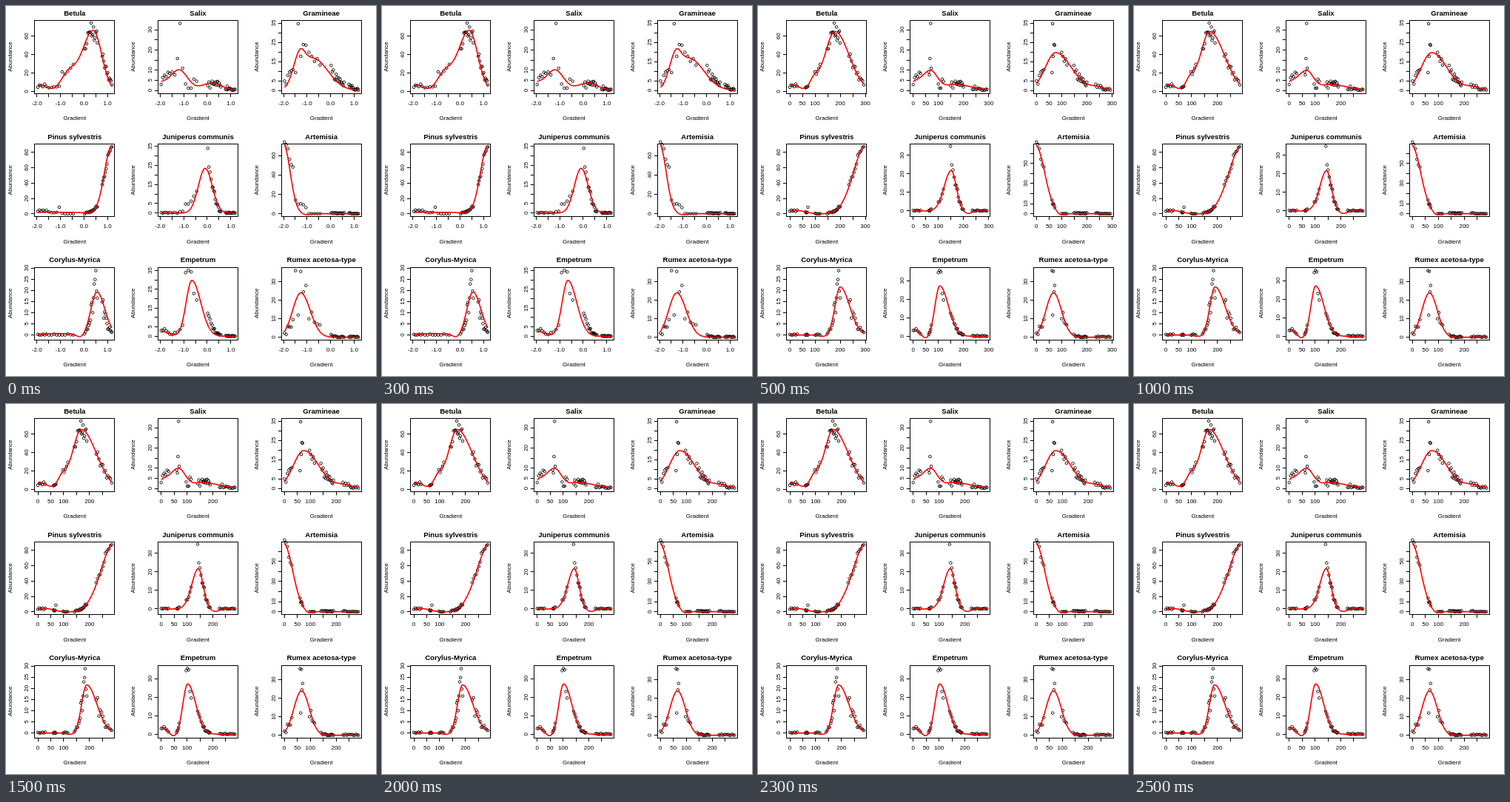
An HTML page with a canvas for the animation above (3000 ms loop, 500 px wide and 500 px high).

```html
<!DOCTYPE html>
<html>
<head>
<meta charset="utf-8">
<style>
html, body { margin: 0; width: 100%; height: 100%; overflow: hidden; background: #fff; }
canvas { display: block; }
</style>
</head>
<body>
<canvas id="stage" width="500" height="500"></canvas>
<script>
const ctx = document.getElementById('stage').getContext('2d');
const FONT = '"Liberation Sans", Arial, sans-serif';
const STEP = 500, PANEL = 500 / 3;
const BOX = { left: 38.97, top: 19.96, right: 146.7, bottom: 118.2 };
// How far the middle of the gradient has settled to the left in each step
const SHIFT = [0, 0, 1.5, 1.9, 2.05, 2.1];

let seed = 11;
const random = () => (seed = seed * 16807 % 2147483647) / 2147483647;

// Evenly spread samples: a group spans a range before and another after fitting
const group = (count, from, to, fitFrom, fitTo) => Array.from({ length: count }, (_, i) => {
  const t = i / (count - 1);
  return { start: from + (to - from) * t, fitted: fitFrom + (fitTo - fitFrom) * t };
});
const samples = [
  ...group(6, 43, 54.5, 43, 53),
  ...group(5, 58, 72, 64, 67.5),
  ...group(5, 76, 91, 77, 84),
  ...group(5, 106, 112, 93.5, 100),
  ...group(11, 113, 123.5, 101, 111),
  ...group(13, 130, 143, 123, 143)
];

// Sum of bell curves, each [centre, height, left width, right width]
const hills = (...bells) => x => bells.reduce((sum, [centre, height, left, right = left]) =>
  sum + height * Math.exp(-(((x - centre) / (x < centre ? left : right)) ** 2)), 0);

const axis = (zero, gap, labels) => ({ zero, gap, labels: labels.split(',') });

const charts = [];
// Heights scatter around the fitted curve; peaks fixes a few striking samples
function chart(title, { axes: [first, later = first], before, after, spread = 0.12, peaks = {} }) {
  const heights = samples.map(({ fitted }, i) => {
    const h = Math.max(after(fitted), 0);
    return peaks[i] ?? Math.max(0, h + (random() * 2 - 1) * (1.5 + spread * h));
  });
  charts.push({ title, heights, states: [{ ...first, curve: before }, { ...later, curve: after }] });
}

chart('Betula', {
  axes: [axis(115.5, 24.9, '0,20,40,60')],
  before: hills([118, 82.5, 22, 16], [84, 22, 14], [46, 8.5, 14]),
  after: hills([104, 81, 19, 27], [76, 14, 9], [47, 9, 13]),
  peaks: { 23: 92.5 }
});
chart('Salix', {
  axes: [axis(114, 13.65, '0,5,10,,20,,30')],
  before: hills([67.5, 27, 15, 16], [43, 10, 15], [112, 10, 20, 18]),
  after: hills([66.5, 26, 16, 13], [43, 9, 13], [100, 8, 22, 30]),
  spread: 0.4,
  peaks: { 8: 43, 9: 90.5, 12: 3, 13: 3 }
});
chart('Gramineae', {
  axes: [axis(114, 13, '0,5,,15,,25,,35')],
  before: hills([63, 34, 12, 10], [82, 43, 22, 28]),
  after: hills([69, 51, 20, 30], [125, 4, 15]),
  spread: 0.25,
  peaks: { 6: 24, 7: 90, 9: 62 }
});
chart('Pinus sylvestris', {
  axes: [axis(114.3, 20.8, '0,20,40,60,80')],
  before: hills([143, 92, 14], [53, 2, 20], [90, 2, 30]),
  after: hills([146, 93, 24], [53, 4.5, 16]),
  spread: 0.06,
  peaks: { 10: 9 }
});
chart('Juniperus communis', {
  axes: [axis(113.2, 12.9, '0,5,,15,,25,,35'), axis(110.3, 25, '0,10,20,30')],
  before: hills([102.5, 60.5, 13, 13.5]),
  after: hills([94.5, 54.5, 13.5, 9.5], [117, -3.5, 7]),
  peaks: { 16: 87.5 }
});
chart('Artemisia', {
  axes: [axis(114, 26.2, '0,20,40,60'), axis(114, 13.6, '0,10,,30,,50,')],
  before: hills([42, 93, 12.3], [72, -1.5, 6]),
  after: hills([42, 92, 17], [75, -3, 7]),
  spread: 0.06
});
chart('Corylus-Myrica', {
  axes: [axis(111.3, 15.1, '0,5,10,15,20,25,30')],
  before: hills([123, 58, 11.5, 15], [101, -4, 7], [70, 2, 30]),
  after: hills([111, 65, 9.8, 18], [89, -2, 8]),
  spread: 0.3,
  peaks: { 27: 69, 28: 75, 29: 87, 31: 50 }
});
chart('Empetrum', {
  axes: [axis(113, 12.7, '0,5,,15,,25,,35'), axis(113, 25, '0,10,20,30')],
  before: hills([84.5, 75.5, 11, 17], [46, 6, 12]),
  after: hills([79, 68, 9.2, 16.5], [43, 9, 12], [60, -4, 7]),
  peaks: { 11: 86, 12: 89, 13: 87, 15: 49 }
});
chart('Rumex acetosa-type', {
  axes: [axis(114.3, 25, '0,10,20,30')],
  before: hills([65, 60, 15.5, 18]),
  after: hills([66, 60, 14.5, 15.2]),
  spread: 0.3,
  peaks: { 6: 90, 7: 30, 8: 89, 10: 70 }
});

function text(str, x, y, font, turned) {
  ctx.save();
  ctx.translate(x, y);
  if (turned) ctx.rotate(-Math.PI / 2);
  ctx.font = `${font} ${FONT}`;
  ctx.fillText(str, 0, 0);
  ctx.restore();
}

function line(x1, y1, x2, y2) {
  ctx.beginPath();
  ctx.moveTo(x1, y1);
  ctx.lineTo(x2, y2);
  ctx.stroke();
}

function xAxis(step) {
  if (step === 0) return [41.7, 15.9, '-2.0,,-1.0,,0.0,,1.0'];
  return step === 1 ? [43, 17, '0,50,100,,200,,300'] : [43, 17.45, '0,50,100,,200,'];
}

function drawChart({ title, heights, states }, step, originX, originY) {
  const { zero, gap, labels, curve } = states[step ? 1 : 0];
  const settle = x => x - SHIFT[step] * Math.exp(-(((x - 108) / 20) ** 2));
  const snapX = x => Math.floor(x + originX) + 0.5 - originX;
  const snapY = y => Math.floor(y + originY) + 0.5 - originY;

  ctx.strokeStyle = ctx.fillStyle = '#000';
  ctx.lineWidth = 0.9;
  samples.forEach(({ start, fitted }, i) => {
    ctx.beginPath();
    ctx.arc(step ? settle(fitted) : start, zero - heights[i], 1.8, 0, 2 * Math.PI);
    ctx.stroke();
  });

  ctx.strokeStyle = '#f00';
  ctx.lineWidth = 1.6;
  ctx.beginPath();
  for (let x = 43; x <= 143; x += 0.5) ctx.lineTo(settle(x), zero - curve(x));
  ctx.stroke();

  ctx.strokeStyle = '#000';
  ctx.lineWidth = 1;
  const left = snapX(BOX.left), bottom = snapY(BOX.bottom), top = snapY(BOX.top);
  ctx.strokeRect(left, top, snapX(BOX.right) - left, bottom - top);
  const [firstTick, tickGap, tickLabels] = xAxis(step);
  tickLabels.split(',').forEach((label, i) => {
    const x = firstTick + i * tickGap;
    line(snapX(x), bottom, snapX(x), bottom + 4.7);
    text(label, x, 133.5, '8px');
  });
  labels.forEach((label, i) => {
    const y = zero - i * gap;
    line(left - 4.7, snapY(y), left, snapY(y));
    text(label, 30.3, y, '8px', true);
  });
  text(title, 92.8, 13, 'bold 9.6px');
  text('Gradient', 92.8, 154, '8px');
  text('Abundance', 7.8, 68.5, '8px', true);
}

let shown = -1;
function frame(now) {
  const step = Math.floor(now / STEP) % SHIFT.length;
  if (step !== shown) {
    shown = step;
    ctx.fillStyle = '#fff';
    ctx.fillRect(0, 0, 500, 500);
    ctx.textAlign = 'center';
    charts.forEach((c, i) => {
      const x = i % 3 * PANEL, y = Math.floor(i / 3) * PANEL;
      ctx.save();
      ctx.translate(x, y);
      drawChart(c, step, x, y);
      ctx.restore();
    });
  }
  requestAnimationFrame(frame);
}
frame(0);
</script>
</body>
</html>
```
